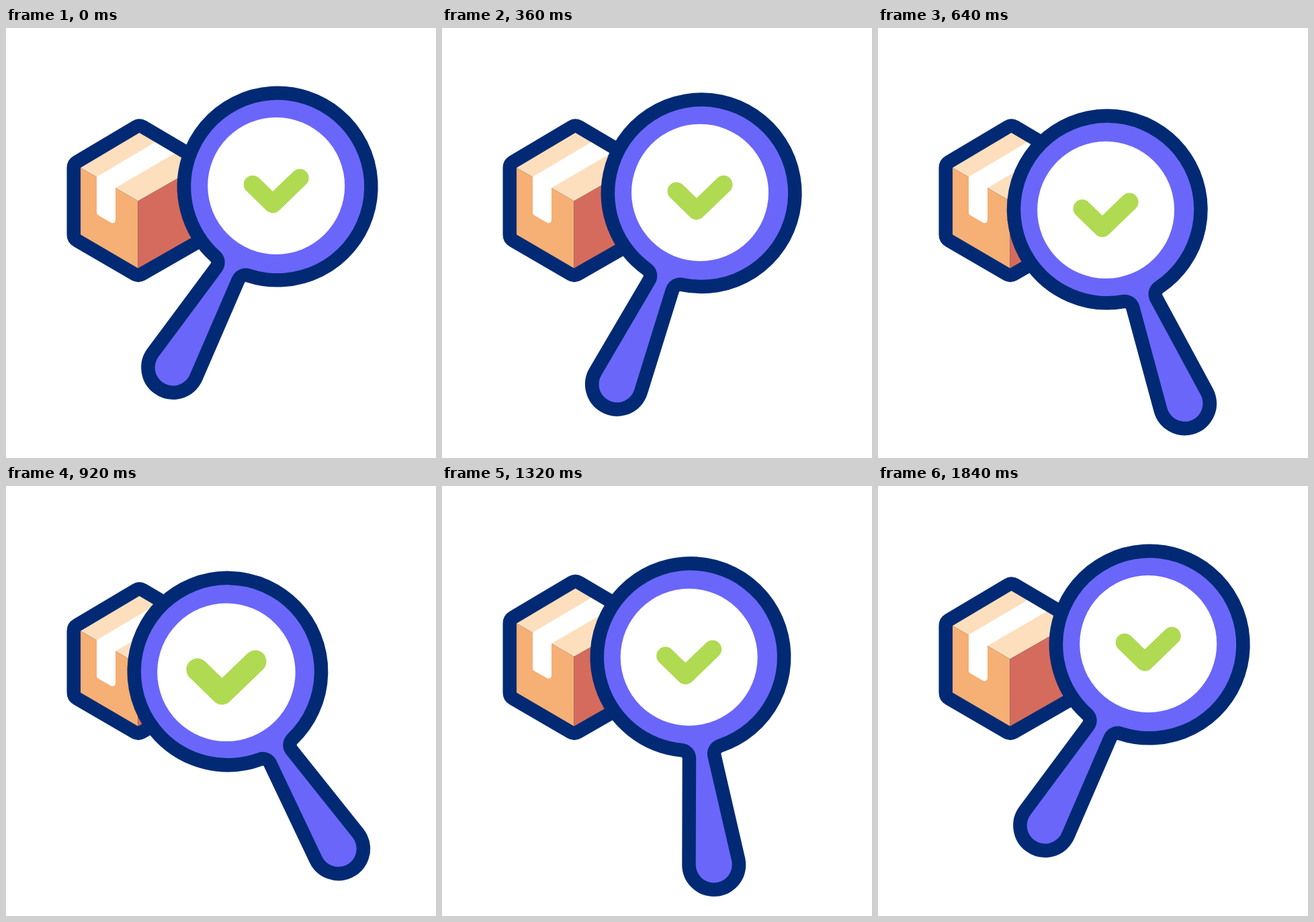
An HTML page with a canvas for the animation above (2 s loop, 640 by 640 pixels).

```html
<!DOCTYPE html>
<html lang="en">
<head>
<meta charset="utf-8">
<title>Parcel inspection</title>
<style>
  html, body { margin: 0; width: 100%; height: 100%; overflow: hidden; background: #fff; }
  canvas { display: block; width: 640px; height: 640px; }
</style>
</head>
<body>
<canvas id="stage" width="640" height="640"></canvas>
<script>
const ctx = document.getElementById('stage').getContext('2d');
const LOOP = 2000, STEP = 40, OUTLINE = 41;
const NAVY = '#022a74', PURPLE = '#6a66fa', GREEN = '#b0da52';
const LIGHT = '#fddfbd', ORANGE = '#f6af74', RED = '#d56b5d';

const clamp = v => Math.min(1, Math.max(0, v));
const smooth = u => u * u * (3 - 2 * u);

// Cubic easing with handles (x1, 0) and (x2, 1), solved by bisection.
function ease(u, x1, x2) {
  let lo = 0, hi = 1;
  for (let i = 0; i < 24; i++) {
    const s = (lo + hi) / 2, r = 1 - s;
    if (3 * s * r * r * x1 + 3 * s * s * r * x2 + s ** 3 < u) lo = s; else hi = s;
  }
  return smooth(lo);
}

// Smooth interpolation through [time, value] keys.
function track(t, keys) {
  if (t <= keys[0][0]) return keys[0][1];
  for (let i = 1; i < keys.length; i++) {
    const [t0, a] = keys[i - 1], [t1, b] = keys[i];
    if (t <= t1) return a + (b - a) * smooth((t - t0) / (t1 - t0));
  }
  return keys[keys.length - 1][1];
}

function polygon(color, ...points) {
  ctx.beginPath();
  points.forEach(([x, y]) => ctx.lineTo(x, y));
  ctx.closePath();
  ctx.fillStyle = color;
  ctx.fill();
}

function outline() {
  ctx.strokeStyle = NAVY;
  ctx.lineWidth = OUTLINE;
  ctx.lineJoin = 'round';
  ctx.stroke();
}

// Only the lid and the tape move; the base stays put.
function drawBox(dy) {
  const top = [198.5, 156 + dy], left = [111, 208 + dy], right = [285, 207 + dy];
  const front = [196.5, 257.5 + dy];
  const baseLeft = [111, 307.5], baseRight = [285, 307], base = [197, 357.5];
  polygon(NAVY, top, right, baseRight, base, baseLeft, left);
  outline();
  polygon(LIGHT, left, top, right, front);
  polygon(ORANGE, left, front, [196.5, 357.5], baseLeft);
  polygon(RED, front, right, baseRight, [196.5, 357.5]);

  ctx.save();
  ctx.translate(0, dy);
  ctx.beginPath();
  ctx.moveTo(222, 170);
  ctx.lineTo(250.5, 187);
  ctx.lineTo(163, 238);
  ctx.lineTo(163, 285);
  ctx.arcTo(163, 293.5, 135, 277.5, 4.5);
  ctx.arcTo(135, 277.5, 135, 221.5, 4.5);
  ctx.lineTo(135, 221.5);
  ctx.closePath();
  ctx.fillStyle = '#fff';
  ctx.fill();
  ctx.restore();
}

// Ring and tapered handle joined by fillets, hanging straight down.
function magnifierPath() {
  const ring = 129, tip = 27, length = 311, fillet = 22.5, taper = 0.115;
  const d = tip - length * Math.sin(taper) + fillet;
  const along = Math.sqrt((ring + fillet) ** 2 - d * d);
  const x = d * Math.cos(taper) + along * Math.sin(taper);
  const y = along * Math.cos(taper) - d * Math.sin(taper);
  const phi = Math.atan2(y, x);
  ctx.beginPath();
  ctx.arc(0, 0, ring, phi, Math.PI - phi, true);
  ctx.arc(-x, y, fillet, -phi, taper);
  ctx.arc(0, length, tip, Math.PI + taper, -taper, true);
  ctx.arc(x, y, fillet, Math.PI - taper, Math.PI + phi);
  ctx.closePath();
}

function drawMagnifier(x, y, angle, lensScale, checkScale) {
  ctx.save();
  ctx.translate(x, y);
  ctx.rotate(angle);
  magnifierPath();
  outline();
  ctx.fillStyle = PURPLE;
  ctx.fill();
  ctx.restore();

  // The lens sits slightly off the ring's centre; the check stays upright.
  ctx.save();
  ctx.translate(x - 2.3 * Math.cos(angle), y - 2.3 * Math.sin(angle));
  ctx.beginPath();
  ctx.arc(0, 0, 102 * lensScale, 0, Math.PI * 2);
  ctx.fillStyle = '#fff';
  ctx.fill();
  ctx.translate(0, 7.5);
  ctx.scale(checkScale, checkScale);
  ctx.beginPath();
  ctx.moveTo(-35, -9.5);
  ctx.lineTo(-5.2, 19.5);
  ctx.lineTo(35, -19.3);
  ctx.strokeStyle = GREEN;
  ctx.lineWidth = 27;
  ctx.lineCap = ctx.lineJoin = 'round';
  ctx.stroke();
  ctx.restore();
}

function draw(t) {
  const travel = start => ease(clamp((t - start) / 720), 0.333, 0.46);
  const move = travel(160) - travel(1000);
  const degrees = track(t, [[260, 30], [772, -32], [1094, -32], [1606, 30]]);
  const lid = track(t, [[800, 0], [1000, 12], [1200, -12], [1500, 12], [1840, 0]]);
  const lens = track(t, [[880, 1], [1080, 1.075], [1280, 1]]);
  const check = track(t, [[800, 1], [1000, 1.355], [1200, 1]]);

  ctx.fillStyle = '#fff';
  ctx.fillRect(0, 0, 640, 640);
  drawBox(lid);
  drawMagnifier(404.2 - 74.3 * move, 236.1 + 40 * move, degrees * Math.PI / 180, lens, check);
}

const begin = performance.now();
function tick() {
  const t = (performance.now() - begin) % LOOP;
  draw(Math.floor(t / STEP) * STEP);
  requestAnimationFrame(tick);
}
tick();
</script>
</body>
</html>
```
